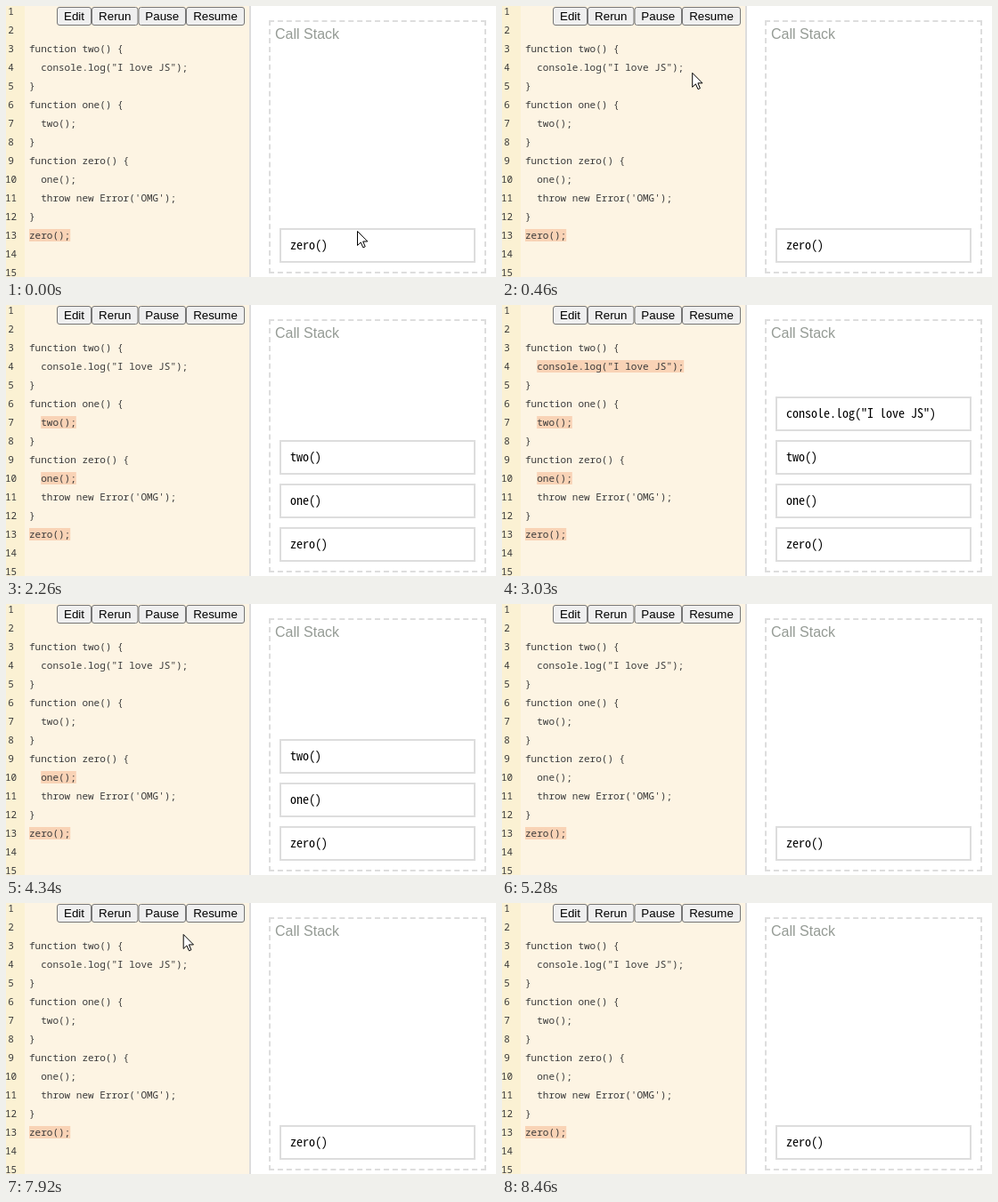
An HTML page for the animation above (8.69 s loop, 550x305 px).

```html
<!DOCTYPE html>
<html lang="en">
<head>
<meta charset="utf-8">
<title>Call stack</title>
<style>
  html, body { margin: 0; width: 100%; height: 100%; overflow: hidden; background: #fff; }
  #frame { position: absolute; left: 295px; top: 16px; width: 244px; height: 285px;
    box-sizing: border-box; border: 2px dashed #ddd; }
  svg { position: absolute; left: 0; top: 0; }
  text { white-space: pre; }
  .code { font: 11px "Noto Sans Mono", "DejaVu Sans Mono", monospace; fill: #3a3a3a; }
  .entry { font: 14px "Noto Sans Mono CJK KR", "Noto Sans Mono CJK JP", "Noto Sans Mono", monospace;
    font-size-adjust: ch-width 0.5; }
  .label { font: 13.333px "Liberation Sans", Arial, sans-serif; }
  .title { font: 16px "Liberation Sans", Arial, sans-serif; fill: #959b95; }
</style>
</head>
<body>
<div id="frame"></div>
<svg id="stage" width="550" height="305"></svg>
<script>
const LOOP = 8690, FADE = 80, CHAR = 6.6, CODE_X = 26;

const source = `

function two() {
  console.log("I love JS");
}
function one() {
  two();
}
function zero() {
  one();
  throw new Error('OMG');
}
zero();

`.split('\n');

// on/off: highlight times; full/gone: stack entry times
const calls = [
  { line: 13, on: -1, full: -1, off: Infinity, gone: Infinity },
  { line: 10, on: 1400, full: 1550, off: 5130, gone: 5280 },
  { line: 7, on: 2180, full: 2260, off: 4340, gone: 4500 },
  { line: 4, on: 2870, full: 3030, off: 3640, gone: 3790 },
];
const buttons = [['Edit', 57, 39], ['Rerun', 96, 52.5], ['Pause', 148.5, 53.5], ['Resume', 202, 66]];

const stage = document.getElementById('stage');

function add(tag, attrs, content = '', parent = stage) {
  const el = document.createElementNS('http://www.w3.org/2000/svg', tag);
  for (const key in attrs) el.setAttribute(key, attrs[key]);
  el.textContent = content;
  return parent.appendChild(el);
}
const rect = (x, y, width, height, fill, more = {}, parent = stage) =>
  add('rect', { x, y, width, height, fill, ...more }, '', parent);
const lineY = n => 6 + 21 * (n - 1);

rect(0, 0, 273, 305, '#fdf4e3');
rect(0, 0, 21, 305, '#fbf1d3');
rect(273, 0, 2, 305, '#ddd');
add('text', { class: 'title', x: 302, y: 37 }, 'Call Stack');

calls.forEach((call, i) => {
  const text = source[call.line - 1], body = text.trim();
  const x = CODE_X + (text.length - body.length) * CHAR, top = 250 - 49 * i;
  call.mark = rect(x, lineY(call.line) - 7, body.length * CHAR, 14, '#f9d3b6');
  call.box = add('g', {});
  rect(308, top + 1, 218, 37, '#fff', { stroke: '#ddd', 'stroke-width': 2 }, call.box);
  add('text', { class: 'entry', x: 319, y: top + 24 }, body.slice(0, -1), call.box);
});

source.forEach((text, i) => {
  const y = lineY(i + 1) + 4;
  add('text', { class: 'code', x: 5.5, y, 'text-anchor': 'middle' }, i + 1);
  add('text', { class: 'code', x: CODE_X, y }, text);
});

const faces = buttons.map(([name, x, width]) => {
  const face = rect(x + .5, 1.5, width - 1, 20, '#efefef', { rx: 2.5, stroke: '#767676' });
  add('text', { class: 'label', x: x + width / 2, y: 16, 'text-anchor': 'middle' }, name);
  return face;
});

const cursor = add('path', {
  d: 'M.5 .5V16.5L4.2 13 6.8 18.8 9.2 17.8 6.7 12H11.8Z',
  fill: '#fff', stroke: '#000', 'stroke-linejoin': 'round',
});

// Stepped progress: first step at `start`, last one at `end`
const steps = (t, start, end, n) =>
  t < start ? 0 : Math.min(n, Math.floor((t - start) / (end - start) * (n - 1) + 1)) / n;
const smooth = p => p * p * (3 - 2 * p);
const mix = (a, b, p) => a.map((v, i) => v + (b[i] - v) * p);

function pointer(t) {
  if (t < 770) return mix([394, 253], [115, -22], smooth(steps(t, 70, 770, 10)));
  if (t < 7370 || t >= 8460) return [0, -50];
  if (t < 7770) return mix([164, -7.7], [168, 3], steps(t, 7370, 7600, 4));
  return mix([168, 3], [463, 310], smooth(steps(t, 7770, 8460, 10)));
}

function draw(t) {
  for (const { on, off, full, gone, mark, box } of calls) {
    mark.style.opacity = t >= on && t < off ? 1 : 0;
    box.style.opacity = t < full - FADE || t >= gone ? 0 : t < full || t >= gone - FADE ? .5 : 1;
  }
  const [x, y] = pointer(t);
  cursor.setAttribute('transform', `translate(${x} ${y})`);
  buttons.forEach(([, left, width], i) => {
    const hover = y >= 1 && y < 22 && x >= left && x < left + width;
    faces[i].setAttribute('fill', hover ? '#e5e5e5' : '#efefef');
  });
}

const began = performance.now();
(function tick() {
  draw((performance.now() - began) % LOOP);
  requestAnimationFrame(tick);
})();
</script>
</body>
</html>
```
